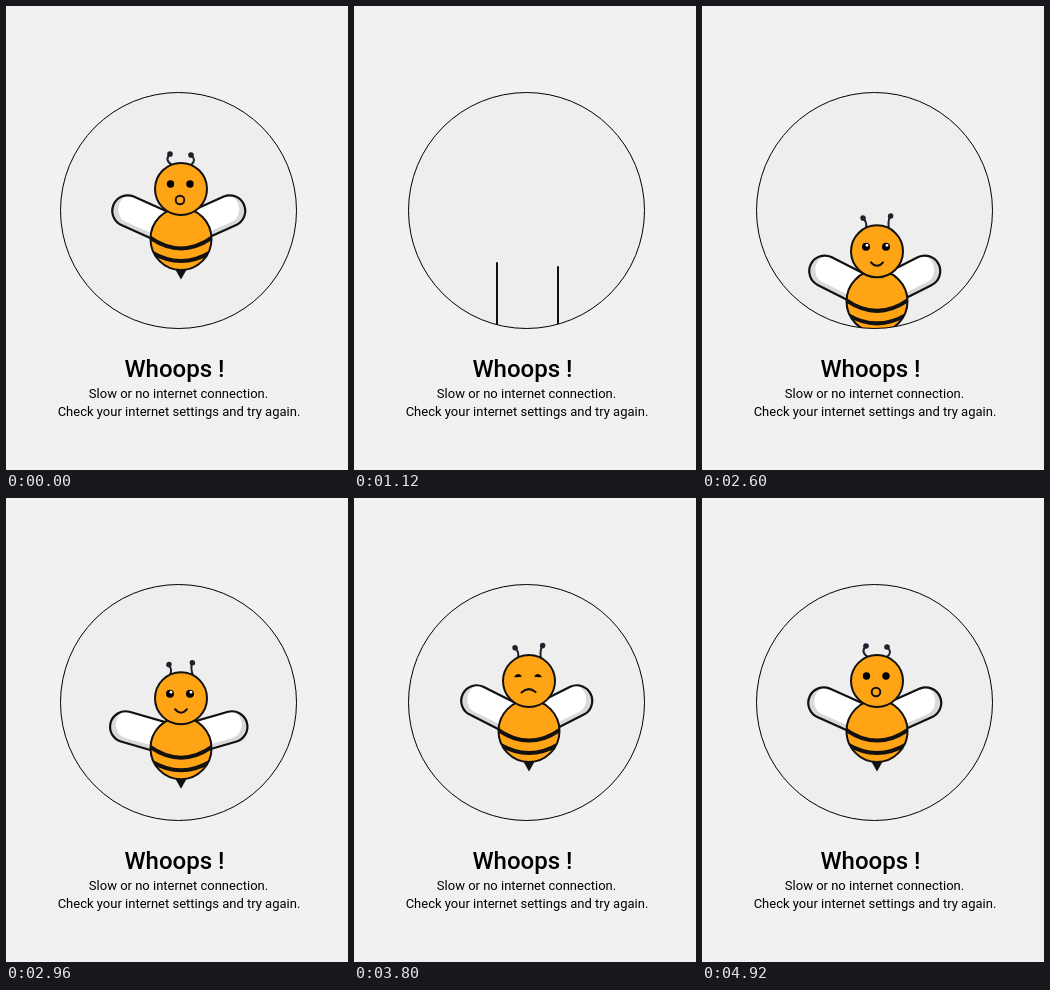
These frames come from a looping animation (342x464 px, 4.96 s). An HTML page:

```html
<!DOCTYPE html>
<html lang="en">
<head>
<meta charset="utf-8">
<title>No connection</title>
<style>
  html, body { margin: 0; width: 100%; height: 100%; overflow: hidden; background: #f1f1f1; }
  svg { display: block; width: 342px; height: 464px; }
  text { font-family: Roboto, Arial, sans-serif; font-size: 13px; text-anchor: middle; }
  .title { font-size: 24px; font-weight: 500; }
  .ink { fill: none; stroke: #111; stroke-width: 2; stroke-linecap: round; }
  .skin { fill: #ffa414; stroke: #111; stroke-width: 2; }
  .stem { fill: none; stroke: #1b222d; stroke-width: 2; stroke-linecap: round; }
  .knob { fill: #1b222d; }
</style>
</head>
<body>
<svg viewBox="0 0 342 464">
  <defs>
    <clipPath id="hole"><circle cx="172.5" cy="204.5" r="118"/></clipPath>
    <clipPath id="stripes"><ellipse cx="175" cy="233" rx="30.5" ry="31"/></clipPath>
    <path id="wingShape" d="M0-14L-50-15.5A15.5 15.5 0 0 0-50 15.5L0 17Z"/>
    <clipPath id="wingClip"><use href="#wingShape"/></clipPath>
    <g id="wing">
      <use href="#wingShape" fill="#d9d9d9"/>
      <path d="M0-18H-50A15 15 0 0 0-57 6Q-54 11-46 11L0 12Z" fill="#fff" clip-path="url(#wingClip)"/>
      <use href="#wingShape" fill="none" stroke="#111" stroke-width="2.2"/>
    </g>
  </defs>

  <circle cx="172.5" cy="204.5" r="118" fill="#eee"/>
  <g clip-path="url(#hole)">
    <g id="trails" class="ink">
      <line id="trailL" x1="143" x2="143"/>
      <line id="trailR" x1="204" x2="204"/>
    </g>
    <g id="bee">
      <use id="wingL" href="#wing"/>
      <use id="wingR" href="#wing"/>
      <path d="M168.500 262H181.500L175 273.500Z" fill="#111"/>
      <ellipse class="skin" cx="175" cy="233" rx="30.5" ry="31"/>
      <g clip-path="url(#stripes)" fill="none" stroke="#111" stroke-width="4">
        <path d="M143 231Q175 254 207 231"/>
        <path d="M145 246Q175 264 205 246"/>
      </g>

      <g id="alertFeelers">
        <path class="stem" d="M166 159Q158 154 164 148M185 159Q191 154 185 149"/>
        <circle class="knob" cx="164" cy="148" r="2.800"/>
        <circle class="knob" cx="185" cy="149" r="2.800"/>
      </g>
      <g id="calmFeelers">
        <g id="feelerL">
          <path class="stem" d="M164 160Q166 154 162 150"/>
          <circle class="knob" cx="162" cy="149.500" r="2.800"/>
        </g>
        <g id="feelerR">
          <path class="stem" d="M187 160Q185 154 187 148"/>
          <circle class="knob" cx="187.500" cy="147.500" r="2.800"/>
        </g>
      </g>
      <circle class="skin" cx="175" cy="183" r="26"/>

      <g id="alert">
        <circle cx="164.500" cy="178" r="3.700"/>
        <circle cx="184" cy="178" r="3.700"/>
        <circle class="ink" cx="174" cy="194" r="4.300"/>
      </g>
      <g id="happy">
        <circle cx="164" cy="178.500" r="4"/>
        <circle cx="184" cy="178.500" r="4"/>
        <circle cx="165" cy="177" r="1.400" fill="#fff"/>
        <circle cx="185" cy="177" r="1.400" fill="#fff"/>
        <path class="ink" d="M169 194Q175 201 181 194"/>
      </g>
      <g id="sad">
        <path d="M160 179Q164 173.500 168 178.500Q164 179.500 160 179ZM180 178.500Q184 173.500 188 179Q184 179.500 180 178.500Z"/>
        <path class="ink" d="M167.500 194.500Q174.500 188 181.500 194"/>
      </g>
    </g>
  </g>
  <circle cx="172.500" cy="204.500" r="118" fill="none" stroke="#000"/>

  <text class="title" x="168.500" y="371">Whoops !</text>
  <text x="172.500" y="392">Slow or no internet connection.</text>
  <text x="173" y="410">Check your internet settings and try again.</text>
</svg>
<script>
  const LOOP = 4960;
  const REST = 22.4;
  const LOW = 9.5;
  const HIGH = 30;
  const FLAP = 240;
  const FLAP_PEAK = 3360;
  const FLAP_END = 4680;

  // [ms, value]
  const beeY = [
    [0, 0], [120, -4], [240, -13], [340, -20], [440, -23], [500, -23], [560, -18],
    [600, -5], [680, 32], [800, 85], [960, 145], [1080, 178], [1920, 178], [1960, 171],
    [2480, 81], [2600, 62.5], [2800, 35], [3040, 8.5], [3200, 0], [LOOP, 0]
  ];
  const trailTop = [[600, 142], [680, 180], [1120, 257]];
  const trailEnd = [[600, 183], [680, 219], [1120, 330]];

  const $ = id => document.getElementById(id);
  const show = (id, on) => $(id).setAttribute('visibility', on ? 'visible' : 'hidden');
  const move = (id, value) => $(id).setAttribute('transform', value);

  function track(steps, t) {
    if (t <= steps[0][0]) return steps[0][1];
    for (let i = 1; i < steps.length; i++) {
      const [a, from] = steps[i - 1];
      const [b, to] = steps[i];
      if (t <= b) return from + (to - from) * (t - a) / (b - a);
    }
    return steps[steps.length - 1][1];
  }

  function wingAngle(t, phase) {
    if (t < 1940) return REST;
    if (t < FLAP_END) return (HIGH + LOW) / 2 + (HIGH - LOW) / 2 * Math.cos(phase);
    const p = Math.min(1, (t - FLAP_END) / 240);
    return LOW + (REST - LOW) * p * p * (3 - 2 * p);
  }

  function trail(id, top, end) {
    $(id).setAttribute('y1', top);
    $(id).setAttribute('y2', end);
  }

  function draw(t) {
    const phase = 2 * Math.PI * (t - FLAP_PEAK) / FLAP;
    const angle = wingAngle(t, phase);
    const sway = 6 * Math.sin(phase);
    const calm = t >= 1940 && t < 4780;

    move('bee', `translate(0 ${track(beeY, t)})`);
    move('wingL', `translate(168 224) rotate(${angle})`);
    move('wingR', `translate(177.5 224) scale(-1 1) rotate(${angle})`);
    move('feelerL', `rotate(${sway} 164 160)`);
    move('feelerR', `rotate(${-sway} 187 160)`);

    show('alertFeelers', !calm);
    show('calmFeelers', calm);
    show('alert', !calm);
    show('happy', calm && t < 3780);
    show('sad', calm && t >= 3780);

    show('trails', t >= 590 && t < 1140);
    const top = track(trailTop, t);
    const end = track(trailEnd, t);
    trail('trailL', top, end);
    trail('trailR', top + 4, end);
  }

  const start = performance.now();
  function tick() {
    draw((performance.now() - start) % LOOP);
    requestAnimationFrame(tick);
  }
  tick();
</script>
</body>
</html>
```
